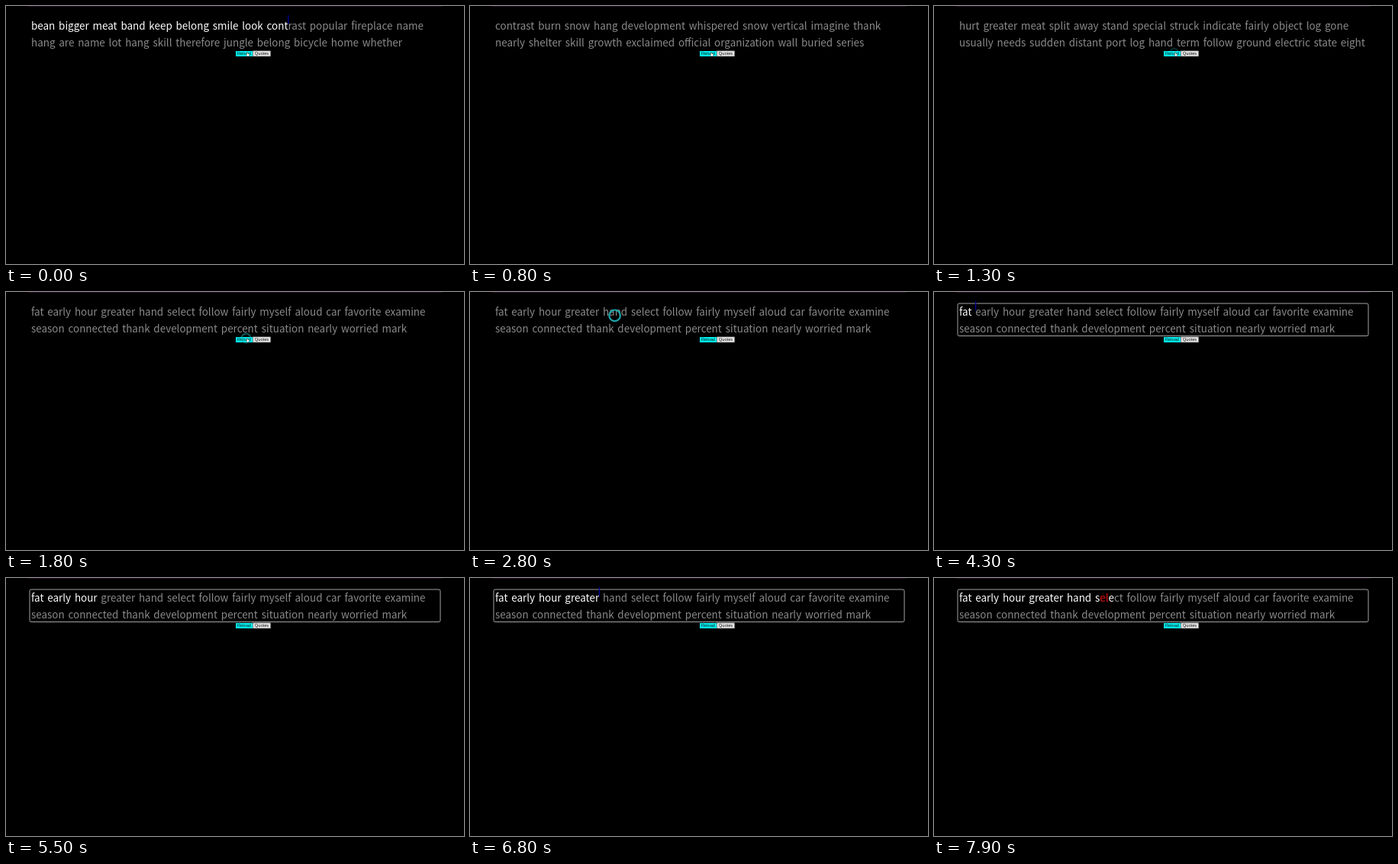
An HTML page that plays this animation: 600x338 px, repeating every 8000 ms.

```html
<!DOCTYPE html>
<html>
<head>
<meta charset="utf-8">
<style>
html, body { margin: 0; width: 100%; height: 100%; overflow: hidden; background: #000; }
svg { display: block; width: 600px; height: 338px; }
.words { font: 13.45px "Noto Sans CJK JP", "Noto Sans CJK SC", "Noto Sans CJK", "Noto Sans", sans-serif; word-spacing: 1.78px; fill: #8a8a8a; white-space: pre; }
.ok { fill: #fff; }
.bad { fill: #a80c0c; stroke: #a80c0c; stroke-width: .5px; }
.label { font: 5.7px "Liberation Sans", Arial, sans-serif; text-anchor: middle; fill: #111; }
</style>
</head>
<body>
<svg viewBox="0 0 600 338">
  <rect x="28" width="544" height="1" fill="#210a20"/>
  <rect id="focus" x="31" y="15" width="538" height="42.5" rx="2" fill="none" stroke="#a2a2a2"/>
  <text class="words" x="33" y="30.9"><tspan id="ok" class="ok"></tspan><tspan id="bad" class="bad"></tspan><tspan id="fixed" class="ok"></tspan><tspan id="rest"></tspan></text>
  <text id="second" class="words" x="33" y="53"></text>
  <rect id="caret" y="12" width="1.3" height="12" fill="#0000a0"/>
  <rect x="301" y="59" width="22" height="7" fill="#00f4f4"/>
  <rect x="323.5" y="58.9" width="23" height="7" fill="#e6e6e6" stroke="#8a8a8a" stroke-width=".6"/>
  <text class="label" x="312" y="64.4">Reload</text>
  <text class="label" x="335" y="64.4">Quotes</text>
  <path id="hand" d="M0 0v3l-1-.4 1.2 2.9h2.6l.6-3.2-2.2-.5V0z" fill="#fff" stroke="#222" stroke-width=".4"/>
  <circle id="ring" fill="none" stroke="#1ca6aa" stroke-width="2.2"/>
</svg>
<script>
const LOOP = 8000, MOVE = 1900, MOVE_END = 2650, FOCUS = 2900;
const $ = id => document.getElementById(id);

const pages = [
  [0, "bean bigger meat band keep belong smile look contrast popular fireplace name",
    "hang are name lot hang skill therefore jungle belong bicycle home whether"],
  [400, "contrast burn snow hang development whispered snow vertical imagine thank",
    "nearly shelter skill growth exclaimed official organization wall buried series"],
  [1250, "hurt greater meat split away stand special struck indicate fairly object log gone",
    "usually needs sudden distant port log hand term follow ground electric state eight"],
  [1750, "fat early hour greater hand select follow fairly myself aloud car favorite examine",
    "season connected thank development percent situation nearly worried mark"]
];
const started = "bean bigger meat band keep belong smile look cont".length;

// Key presses: slow start, a steady run, then the second burst with two slips.
const run = (from, step, count) => Array.from({ length: count }, (_, i) => from + i * step);
const keys = [3200, 3400, 3800, 4000, ...run(4400, 105, 10), 5600, 5800,
  6000, 6150, 6300, 6500, 6700, 6800, 7000, ...run(7100, 90, 9)];
const slip = "fat early hour greater hand s".length;
const clicks = [380, 1250, 1730, 2690];

const lerp = (a, b, p) => a + (b - a) * p;
const clamp = v => Math.min(1, Math.max(0, v));

function drawText(t) {
  const index = pages.findLastIndex(p => t >= p[0]);
  const [, first, second] = pages[index];
  const typed = index === 0 ? started : keys.filter(k => k <= t).length;
  const a = index === 3 ? Math.min(typed, slip) : typed;
  const b = index === 3 ? Math.min(typed, slip + 2) : typed;
  $("ok").textContent = first.slice(0, a);
  $("bad").textContent = first.slice(a, b);
  $("fixed").textContent = first.slice(b, typed);
  $("rest").textContent = first.slice(typed);
  $("second").textContent = second;

  const last = keys.findLast(k => k <= t) ?? FOCUS;
  const shown = index === 0 || t >= FOCUS && t < 7850 && (t - last) % 1000 < 500 && !(t > 5400 && t < 5600);
  $("caret").setAttribute("visibility", shown ? "visible" : "hidden");
  const x = $("ok").parentNode.getStartPositionOfChar(typed).x;
  $("caret").setAttribute("x", x - .3);
}

function drawPointer(t) {
  const p = clamp((t - MOVE) / (MOVE_END - MOVE));
  const ease = p * p * (3 - 2 * p);
  const x = lerp(314.5, 189.6, ease), y = lerp(60.5, 30.8, ease);
  $("hand").setAttribute("transform", `translate(${x + 1} ${y})`);
  $("hand").setAttribute("visibility", x > 301 ? "visible" : "hidden");

  const age = t - (clicks.findLast(c => c <= t) ?? -LOOP);
  const grow = clamp(age / 100);
  const ring = $("ring");
  ring.setAttribute("cx", x);
  ring.setAttribute("cy", y);
  ring.setAttribute("r", lerp(2.5, 7.3, grow));
  ring.setAttribute("opacity", grow * grow * clamp((320 - age) / 180));
}

function frame(now) {
  const t = now % LOOP;
  drawText(t);
  drawPointer(t);
  $("focus").setAttribute("visibility", t >= FOCUS ? "visible" : "hidden");
  requestAnimationFrame(frame);
}
requestAnimationFrame(frame);
</script>
</body>
</html>
```
